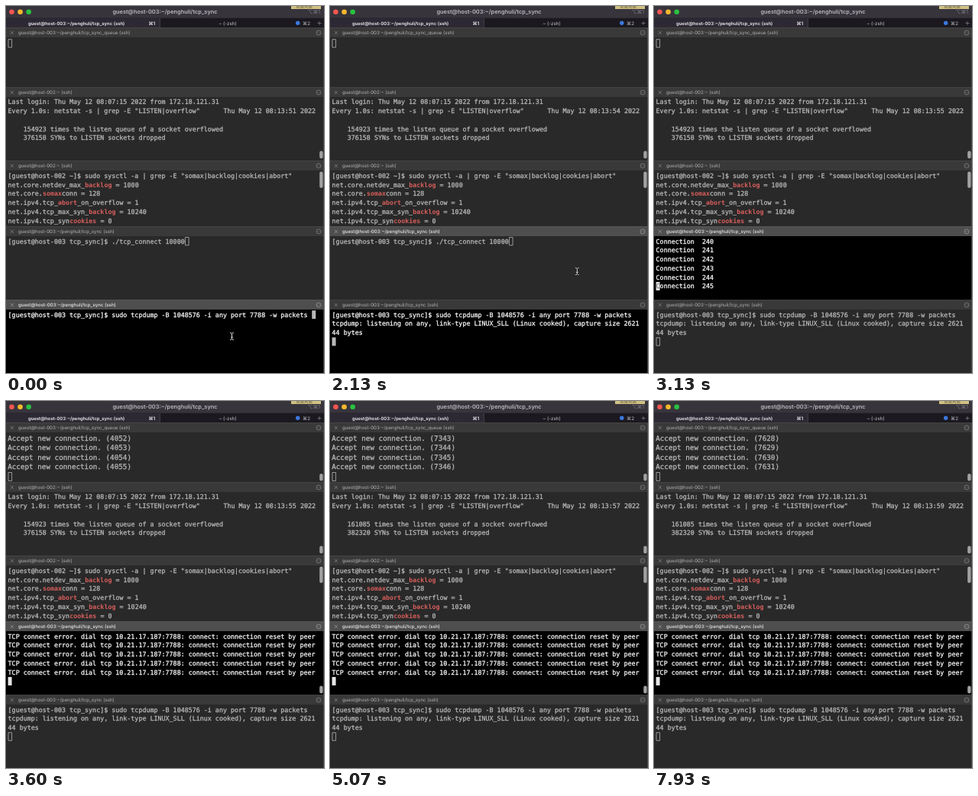
An HTML page with a canvas for the animation above (8000 ms loop, 416 px wide and 480 px high).

```html
<!DOCTYPE html>
<html lang="en">
<head>
<meta charset="utf-8">
<title>Terminal panes</title>
<style>
  html, body { margin: 0; width: 100%; height: 100%; overflow: hidden; background: #292929; }
  canvas { display: block; width: 416px; height: 480px; }
</style>
</head>
<body>
<canvas id="stage"></canvas>
<script>
const W = 416, H = 480, LOOP = 8000, TICK = 200 / 3;
const canvas = document.getElementById('stage');
const ctx = canvas.getContext('2d');
const dpr = window.devicePixelRatio || 1;
canvas.width = W * dpr;
canvas.height = H * dpr;
ctx.scale(dpr, dpr);
ctx.textRendering = 'geometricPrecision';
ctx.lineJoin = 'round';

const MONO = '"DejaVu Sans Mono", monospace';
const SANS = 'Inter, sans-serif';
const SYMBOL = 'Inter, "DejaVu Sans", sans-serif';
const USER = 'guest', HOME = 'penghuli';
const HOST3 = USER + '@host-003', HOST2 = USER + '@host-002';
const PROMPT = '[' + HOST3 + ' tcp_sync]$ ';
const SYNC = HOST3 + ':~/' + HOME + '/tcp_sync';
const CHAR = 5.033, LEFT = 2.6, PITCH = 11.75;
const DIM_BG = 41, DIM_FG = 182, LIT_FG = 245;
const RED = '#d65e5b', THUMB = '#a2a2a2';

// Moments in ms
const ENTER_DUMP = 990, LISTENING = 1130;
const MOVE_START = 1450, MOVE_END = 2000;
const CLICK = 2060, FADE_START = 2140, FADE_END = 2340;
const RUN = 3060, SCROLL = 3190, ERRORS = 3450;
const ACCEPTS = [[3190, 0], [3600, 4055], [4400, 7090], [5067, 7346], [6400, 7623], [7933, 7631]];
const CONNECTS = [[3060, 112], [3134, 246], [3450, 3900]];

const clamp = v => Math.max(0, Math.min(1, v));
const mix = (a, b, k) => a + (b - a) * k;
const smooth = k => k * k * (3 - 2 * k);
const grey = v => { v = Math.round(v); return `rgb(${v},${v},${v})`; };

function along(points, t) {
  for (let i = 1; i < points.length; i++) {
    const [t0, v0] = points[i - 1], [t1, v1] = points[i];
    if (t <= t1) return Math.round(mix(v0, v1, clamp((t - t0) / (t1 - t0))));
  }
  return points[points.length - 1][1];
}

function box(x, y, w, h, color) {
  ctx.fillStyle = color;
  ctx.fillRect(x, y, w, h);
}

function dot(x, y, r, color) {
  ctx.fillStyle = color;
  ctx.beginPath();
  ctx.arc(x, y, r, 0, 7);
  ctx.fill();
}

function line(color, width, ...points) {
  ctx.strokeStyle = color;
  ctx.lineWidth = width;
  ctx.beginPath();
  points.forEach(([x, y], i) => i ? ctx.lineTo(x, y) : ctx.moveTo(x, y));
  ctx.stroke();
}

function label(text, x, y, font, color, align = 'left') {
  ctx.font = font;
  ctx.fillStyle = color;
  ctx.textAlign = align;
  ctx.fillText(text, x, y);
}

// A hairline outline gives the soft, heavier terminal strokes.
function mono(text, x, y, color, weight = '', size = 8.36) {
  label(text, x, y, `${weight} ${size}px ${MONO}`, color);
  if (weight) return;
  ctx.strokeStyle = color;
  ctx.lineWidth = 0.3;
  ctx.strokeText(text, x, y);
}

function cursor(x, baseline, color, solid, h = 11) {
  if (solid) return box(x, baseline - 8.4, 5, h, color);
  ctx.strokeStyle = color;
  ctx.lineWidth = 0.8;
  ctx.strokeRect(x + 0.4, baseline - 8.1, 4.6, h - 0.6);
}

function thumb(y, h) {
  ctx.fillStyle = THUMB;
  ctx.beginPath();
  ctx.roundRect(410.2, y, 4.4, h, 2.2);
  ctx.fill();
}

function paneTitle(y, text, active) {
  box(0, y - 0.6, W, 12.6, active ? '#4e4e4e' : '#393939');
  box(0, y - 0.6, W, 0.7, active ? '#626262' : '#4c4c4c');
  const color = active ? '#ececec' : '#b2b2b2';
  const mark = active ? '#a0a0a0' : '#8a8a8a';
  line(mark, 0.7, [5.7, y + 3.8], [10.1, y + 8.2]);
  line(mark, 0.7, [10.1, y + 3.8], [5.7, y + 8.2]);
  label(text, 16, y + 8.2, `${active ? 500 : 400} 6.12px ${SANS}`, color);
  ctx.strokeStyle = mark;
  ctx.lineWidth = 0.7;
  ctx.beginPath();
  ctx.arc(409, y + 6, 3, 0, 7);
  ctx.stroke();
  for (const dx of [-1.4, 0, 1.4]) dot(409 + dx, y + 6, 0.45, mark);
}

function windowBar() {
  box(0, 0, W, 16, '#37343c');
  dot(7.5, 7.8, 3.3, '#f4564f');
  dot(18.6, 7.8, 3.3, '#f5b82e');
  dot(29.7, 7.8, 3.3, '#2bc140');
  label(SYNC, 208, 10, `600 7.4px ${SANS}`, '#bbb9be', 'center');
  label('⌥⌘1', 411, 9.6, `400 6.8px ${SYMBOL}`, '#817f86', 'right');
  box(373, 0, 39, 4, '#d0c083');
  label('项目列表', 379, 3, '5.5px "Noto Sans CJK SC", "Noto Sans CJK", sans-serif', '#5d573b');

  box(0, 16, 201, 13, '#2d2934');
  box(201, 16, W - 201, 13, '#1b191f');
  box(201, 16, 0.8, 13, '#49464e');
  box(0, 15.6, W, 0.6, '#242127');
  label(SYNC + ' (ssh)', 29, 24.8, `600 5.95px ${SANS}`, '#f2f1f4');
  label('⌘1', 186.5, 24.8, `600 6.2px ${SYMBOL}`, '#eeeef0');
  label('~ (-zsh)', 290, 24.8, `500 6.1px ${SANS}`, '#b2b0b6', 'center');
  dot(381.7, 22.3, 2.7, '#3b78e0');
  label('⌘2', 388, 24.8, `500 6.2px ${SYMBOL}`, '#aaa8ae');
  line('#88868c', 0.7, [407.5, 22.5], [412.5, 22.5]);
  line('#88868c', 0.7, [410, 20], [410, 25]);
}

function acceptPane(t) {
  paneTitle(29, SYNC + '_queue (ssh)', false);
  const fg = grey(DIM_FG);
  if (t < SCROLL) return cursor(LEFT, 51.8, fg, false);
  const last = along(ACCEPTS, t);
  for (let i = 0; i < 4; i++)
    mono(`Accept new connection. (${last - 3 + i})`, 2.2, 52 + i * 12.4, fg, '', 9.28);
  cursor(LEFT, 101.6, fg, false, 11.5);
  thumb(95, 9.5);
}

function watchPane(t) {
  paneTitle(107, HOST2 + ':~ (ssh)', false);
  const fg = grey(DIM_FG);
  const ticks = t < 66 ? 0 : 1 + Math.floor((t - 66) / 995);
  const overflowed = ticks >= 5;
  const row = i => 128.3 + i * PITCH;
  mono('Last login: Thu May 12 08:07:15 2022 from 172.18.121.31', LEFT, row(0), fg);
  mono('Every 1.0s: netstat -s | grep -E "LISTEN|overflow"', LEFT, row(1), fg);
  mono(`Thu May 12 08:13:${51 + ticks} 2022`, LEFT + 56 * CHAR, row(1), fg);
  const indent = LEFT + 4 * CHAR;
  mono(`${overflowed ? 161085 : 154923} times the listen queue of a socket overflowed`, indent, row(3), fg);
  mono(`${overflowed ? 382320 : 376158} SYNs to LISTEN sockets dropped`, indent, row(4), fg);
  thumb(189.5, 10);
}

// Text between asterisks is shown as a match.
const SETTINGS = [
  `[${HOST2} ~]$ sudo sysctl -a | grep -E "somax|backlog|cookies|abort"`,
  'net.core.netdev_max_*backlog* = 1000',
  'net.core.*somax*conn = 128',
  'net.ipv4.tcp_*abort*_on_overflow = 1',
  'net.ipv4.tcp_max_syn_*backlog* = 10240',
  'net.ipv4.tcp_syn*cookies* = 0'
];

function settingsPane() {
  paneTitle(203, HOST2 + ':~ (ssh)', false);
  SETTINGS.forEach((text, i) => {
    let x = LEFT;
    text.split('*').forEach((part, k) => {
      mono(part, x, 224.8 + i * PITCH, k % 2 ? RED : grey(DIM_FG), k % 2 ? 'bold' : '');
      x += part.length * CHAR;
    });
  });
  thumb(216.5, 21.5);
}

function connectPane(t, lit) {
  box(0, 301, W, 84, grey(mix(DIM_BG, 0, lit)));
  paneTitle(289, SYNC + ' (ssh)', t >= CLICK);
  const fg = grey(mix(DIM_FG, LIT_FG, lit));
  const row = i => 310.6 + i * PITCH;
  if (t < RUN) {
    mono(PROMPT + './tcp_connect 10000', LEFT, row(0), fg);
    cursor(LEFT + (PROMPT.length + 19) * CHAR, row(0), fg, lit > 0.5);
  } else if (t < ERRORS) {
    const last = along(CONNECTS, t);
    for (let i = 0; i < 6; i++) mono(`Connection  ${last - 5 + i}`, LEFT, row(i), fg);
    cursor(LEFT, row(5), '#e4e4e4', true);
    mono('C', LEFT, row(5), '#8a8a8a');
  } else {
    for (let i = 0; i < 5; i++)
      mono('TCP connect error. dial tcp 10.21.17.187:7788: connect: connection reset by peer', LEFT, row(i), fg);
    cursor(LEFT, row(5), '#e4e4e4', true);
  }
  if (t >= SCROLL) thumb(372.5, 10);
}

function dumpPane(t, lit) {
  box(0, 397, W, 83, grey(mix(0, DIM_BG, lit)));
  paneTitle(385, SYNC + ' (ssh)', t < CLICK);
  const fg = grey(mix(LIT_FG, DIM_FG, lit));
  const row = i => 406.6 + i * PITCH;
  const command = PROMPT + 'sudo tcpdump -B 1048576 -i any port 7788 -w packets ';
  mono(command, LEFT, row(0), fg);
  let x = LEFT, at = 0;
  if (t < ENTER_DUMP) x += command.length * CHAR;
  else if (t < LISTENING) at = 1;
  else {
    mono('tcpdump: listening on any, link-type LINUX_SLL (Linux cooked), capture size 2621', LEFT, row(1), fg);
    mono('44 bytes', LEFT, row(2), fg);
    at = 3;
  }
  cursor(x, row(at), lit > 0.5 ? fg : '#b8b8b8', lit <= 0.5);
}

function pointer(t) {
  if (t >= RUN - 130) return;
  const k = smooth(clamp((t - MOVE_START) / (MOVE_END - MOVE_START)));
  const x = mix(295.5, 323.3, k), y = mix(432, 347, k);
  const arms = s => [[x - 2.3, y + s * 4.6], [x - 0.9, y + s * 4.4], [x, y + s * 3.5],
    [x + 0.9, y + s * 4.4], [x + 2.3, y + s * 4.6]];
  for (const [color, width] of [['#1a1a1a', 2], ['#e2e2e2', 0.95]]) {
    line(color, width, ...arms(-1));
    line(color, width, ...arms(1));
    line(color, width, [x, y - 3.6], [x, y + 3.6]);
    line(color, width, [x - 1.2, y + 1.3], [x + 1.2, y + 1.3]);
  }
}

function draw(now) {
  const t = Math.floor((now % LOOP + 5) / TICK) * TICK;
  const lit = clamp((t - FADE_START) / (FADE_END - FADE_START));
  box(0, 0, W, H, grey(DIM_BG));
  windowBar();
  acceptPane(t);
  watchPane(t);
  settingsPane();
  connectPane(t, lit);
  dumpPane(t, lit);
  box(W - 0.8, 29, 0.8, H - 29, '#505050');
  pointer(t);
}

const start = performance.now();
function loop() {
  draw(performance.now() - start);
  requestAnimationFrame(loop);
}
loop();
</script>
</body>
</html>
```
